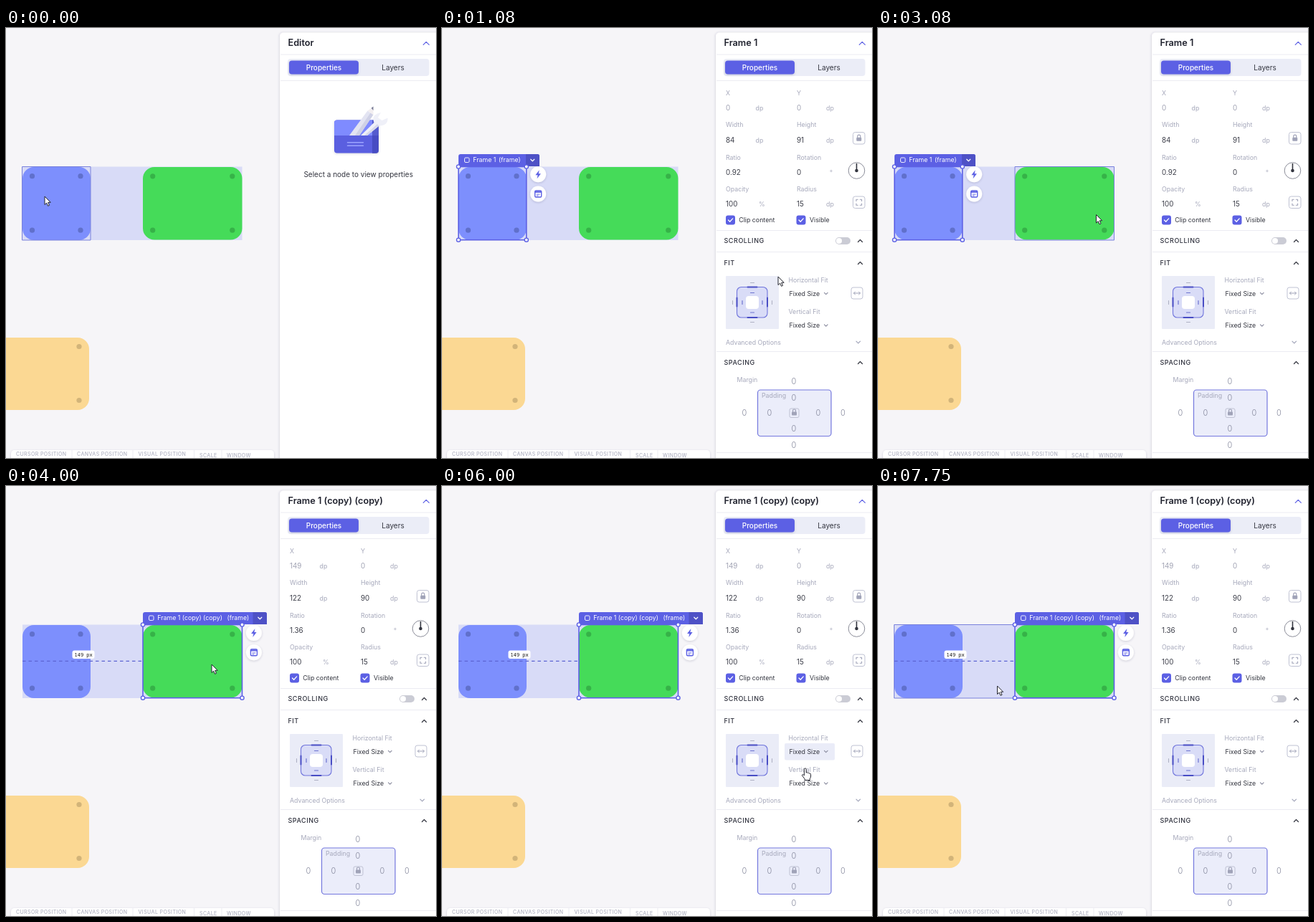
Recreate the animation shown at these times as an HTML page. Size 600 px wide and 600 px high, loop 8 s.

```html
<!DOCTYPE html>
<html lang="en">
<head>
<meta charset="utf-8">
<title>Frame editor</title>
<style>
  html, body { margin: 0; width: 100%; height: 100%; overflow: hidden; background: #f6f5f8; }
  svg { display: block; width: 100vw; height: 100vh; }
  text { font-family: Inter, "Open Sans", sans-serif; font-size: 8.8px; fill: #a6a8bb; white-space: pre; }
  .title { font-size: 12.7px; font-weight: 600; fill: #20222e; }
  .dark { fill: #33353f; }
  .value { font-size: 9.8px; fill: #3b3d48; }
  .dim { font-size: 9.8px; fill: #a0a2b3; }
  .zero { font-size: 11px; font-weight: 300; fill: #85889c; text-anchor: middle; }
  .head { font-size: 9px; font-weight: 500; letter-spacing: .55px; fill: #2f313d; }
  .foot { font-size: 7px; font-weight: 500; letter-spacing: .4px; fill: #b0b2c2; }
  .white { fill: #fff; }
  .mid { text-anchor: middle; }
  .tab { font-size: 10px; }
  .px { font: 500 7px "Noto Sans Mono", "DejaVu Sans Mono", monospace; fill: #111; }
  .rule { stroke: #ececf2; fill: none; }
  .line { fill: none; stroke-linecap: round; stroke-linejoin: round; }
  .box { fill: #fff; stroke: #bfc2d3; }
  .hover { fill: none; stroke: #7880dc; stroke-width: 1; }
</style>
</head>
<body>
<svg id="stage" viewBox="0 0 600 600" xmlns="http://www.w3.org/2000/svg"></svg>
<script>
const BLUE = '#5c60e4', DARK = '#33353f', GRAY = '#a0a3b8';

const text = (x, y, s, cls = '') => `<text x="${x}" y="${y}" class="${cls}">${s}</text>`;
const rect = (x, y, w, h, fill, r = 0, more = '') =>
  `<rect x="${x}" y="${y}" width="${w}" height="${h}" rx="${r}" fill="${fill}" ${more}/>`;
const circle = (x, y, r, fill, more = '') => `<circle cx="${x}" cy="${y}" r="${r}" fill="${fill}" ${more}/>`;
const line = (d, color, w = 1) => `<path class="line" d="${d}" stroke="${color}" stroke-width="${w}"/>`;
const group = (id, body) => `<g id="${id}">${body}</g>`;
const rule = (y, x = 383) => `<path class="rule" d="M${x} ${y}H600"/>`;
const chevron = (x, y, color, size = 3, dir = 1) =>
  line(`M${x - size} ${y + dir * size / 2}l${size} ${-dir * size}l${size} ${dir * size}`, color, 1.2);
const dots = (xs, ys, color) => xs.map(x => ys.map(y => circle(x, y, 3.6, color)).join('')).join('');

const lock = (x, y) => rect(x - 3.5, y - 1, 7, 5, GRAY, 1) +
  line(`M${x - 2} ${y - 1}v-1.5a2 2 0 0 1 4 0v1.5`, GRAY, 1.2);
const check = (x, y) => rect(x - 6.5, y - 6.5, 13, 13, BLUE, 3) +
  line(`M${x - 3} ${y}l2.2 2.3l4 -4.4`, '#fff', 1.3);

function canvas() {
  const labels = [[14, 597, 'CURSOR POSITION'], [99, 597, 'CANVAS POSITION'], [184.5, 597, 'VISUAL POSITION'],
    [270, 599, 'SCALE'], [308, 599, 'WINDOW']];
  return rect(0, 0, 600, 600, '#f6f5f8') +
    rect(23, 193.5, 306.5, 102.5, '#d8dbf7') +
    rect(23, 194, 95, 102, '#7d8ffd', 16) + dots([36.5, 104], [206.7, 282.2], '#6070cb') +
    rect(191, 194, 138.5, 101.5, '#45db59', 16) + dots([204.7, 315.8], [206.8, 282.2], '#36b248') +
    rect(-60, 432, 176, 101, '#fbd893', 16) + dots([102], [444.5, 519.5], '#d2b479') +
    rect(7, 589, 367, 20, '#fff', 5, 'filter="url(#soft)"') +
    [92, 177, 262.5, 301].map(x => `<path class="rule" d="M${x} 589V600"/>`).join('') +
    labels.map(a => text(...a, 'foot')).join('');
}

function shell() {
  return rect(382, 6.5, 240, 620, '#fff', 5, 'filter="url(#shade)"') +
    chevron(586.3, 21.3, BLUE, 4) + rule(37) + rule(73.5) +
    rect(393, 43, 197.5, 24, '#ebedf7', 4) +
    rect(395, 45.5, 97, 19, BLUE, 4, 'filter="url(#soft)"') +
    `<text x="443.5" y="58.7" class="tab white mid" font-weight="500">Properties</text>` +
    text(540, 58.7, 'Layers', 'tab dark mid');
}

function emptyPanel() {
  return text(393.5, 25.3, 'Editor', 'title') +
    `<g filter="url(#soft)">${rect(458, 128.5, 62, 46, '#5a5fe0', 4)}</g>` +
    `<path d="M458 150V132.500a4 4 0 0 1 4 -4H516a4 4 0 0 1 4 4V150Z" fill="#7f8bff"/>
     <path d="M511 128.500h5a4 4 0 0 1 4 4V171a4 4 0 0 1 -4 4h-5Z" fill="#3d42b4" opacity=".65"/>
     <path d="M479 150L504.500 115.500L512.500 121L493 150Z" fill="#e3e4f2"/>
     <path d="M487 150L508.500 118.500L512.500 121L493 150Z" fill="#cfd1e6"/>
     <path d="M504.500 115.500L512.500 109.500L512.500 121Z" fill="#f2eef0"/>
     <path d="M509.700 111.700L512.500 109.500L512.500 115Z" fill="#777b95"/>
     <path d="M495 150L513.500 132Q510 123 518 119.500L523 118L519 125L524.500 129L532.500 125.500Q533.500 136 520.500 136.500L504 150Z" fill="#eff0f8"/>
     <path d="M500 150L518 134L520.500 136.500L504 150Z" fill="#d7d9eb"/>` +
    line('M476.500 159.700H498.500M476.500 164.200H498.500', '#9ca4ff', 1.5) +
    text(491.7, 208.200, 'Select a node to view properties', 'tab dark mid');
}

function fitDiagram() {
  return rect(396, 346, 74, 74, '#eaecf7', 1) +
    rect(411.5, 361.5, 42.5, 42.5, '#d9dcf7', 6, 'stroke="#7075dc" stroke-width="1.1"') +
    rect(424, 374, 18, 18, '#fff', 4) +
    line('M426.500 361.500h13M426.500 404h13M411.500 376.500v12M454 376.500v12', '#484dc4', 2) +
    line('M430.500 369.500h5M430.500 397h5M419 380.500v5M447 380.500v5', '#6d73cf', 1.2) +
    line('M430.500 355.500h5M430.500 410.500h5M405.500 380.500v5M460.500 380.500v5', '#aeb1c4', 1.1);
}

function form() {
  const labels = [[396, 94, 'X'], [495, 94, 'Y'], [396, 138.3, 'Width'], [495, 138.3, 'Height'],
    [396, 183.7, 'Ratio'], [495, 183.7, 'Rotation'], [396, 228.2, 'Opacity'], [495, 228.2, 'Radius'],
    [483.5, 354.8, 'Horizontal Fit'], [483.5, 399.3, 'Vertical Fit'], [396, 441.6, 'Advanced Options'],
    [411.5, 494.2, 'Margin']];
  const units = [115, 159.5, 249].map(y =>
    text(y > 200 ? 442 : 437.5, y, y > 200 ? '%' : 'dp') + text(536, y, 'dp')).join('');
  const zeros = [[491, 497.3], [422, 541.3], [559.5, 541.3], [491, 586]];
  const inner = [[491, 519.5], [457, 541.3], [525, 541.3], [491, 563.3]];
  const zero = ([x, y]) => text(x, y, '0', 'zero');
  return labels.map(a => text(...a)).join('') + units + text(541, 205, '°') +
    text(495, 115.300, '0', 'dim') + text(495, 204.800, '0', 'value') +
    text(396, 249.300, '100', 'value') + text(495, 249.300, '15', 'value') +
    rect(573.5, 145.500, 16.5, 16.5, '#fff', 3, 'class="box"') + lock(581.8, 153.7) +
    circle(578.5, 199, 11.3, '#fff', 'stroke="#8b8d99"') + line('M578.500 199V189.500', DARK, 1.6) +
    circle(578.5, 199, 2.3, DARK) +
    rect(573.5, 235, 16.5, 16.5, '#fff', 3, 'class="box"') +
    line('M578 241.500v-2.300h2.300M583.300 239.200h2.300v2.300M585.600 245v2.300h-2.300M580.300 247.300H578V245', GRAY, 1.1) +
    check(402.5, 268) + text(414.3, 271.400, 'Clip content', 'dark') +
    check(501, 268) + text(513, 271.400, 'Visible', 'dark') +
    rule(282.5) + text(393.5, 300.300, 'SCROLLING', 'head') +
    rect(549, 292, 21, 10, '#cbccd5', 5) + circle(554, 297, 4, '#fff') + chevron(583.5, 297, DARK) +
    rule(312.500) + text(393.5, 331.300, 'FIT', 'head') + chevron(583.5, 328, DARK) +
    fitDiagram() +
    rect(478, 359, 70, 23.500, '#eaecf8', 2, 'id="overH"') + rect(478, 403, 70, 23.500, '#eaecf8', 2, 'id="overV"') +
    text(484.5, 373.500, 'Fixed Size', 'dark') + chevron(535.8, 370.500, '#8b8da0', 2.3, -1) +
    text(484.5, 418, 'Fixed Size', 'dark') + chevron(535.8, 415, '#8b8da0', 2.3, -1) +
    rect(571, 362, 16, 16, '#fff', 3, 'class="box"') +
    line('M574.500 370h9M576.500 368l-2 2l2 2M581.500 368l2 2l-2 2', GRAY) +
    chevron(580.8, 438.500, GRAY, 2.8, -1) +
    rule(451.500) + text(393.5, 470.300, 'SPACING', 'head') + chevron(583.5, 467, DARK) +
    zeros.map(zero).join('') +
    rect(440.5, 505, 102.500, 64.500, '#ebedfa', 4, 'stroke="#7478de" stroke-width="1.2"') +
    text(446, 516, 'Padding') + inner.map(zero).join('') +
    rect(485, 531, 13, 12.500, 'none', 2, 'stroke="#bfc2d3"') + lock(491.5, 536.5) +
    rule(592.500);
}

// Values that depend on the selected node.
function details(name, x, w, h, ratio) {
  return text(393.5, 25.3, name, 'title') + text(396, 115.300, x, 'dim') +
    text(396, 159.700, w, 'value') + text(495, 159.700, h, 'value') + text(396, 204.800, ratio, 'value');
}

// Outline, name tag and round action buttons around a node.
function selection(x, w, tagW, name, typeX, split, btnY) {
  const r = x + w, bx = r + 16.4;
  const handles = [x, r].map(a => [193.5, 295.7].map(b =>
    circle(a, b, 2.6, '#fff', `stroke="${BLUE}" stroke-width="1.4"`)).join('')).join('');
  const round = y => circle(bx, y, 11, '#fff', 'filter="url(#soft)"');
  const y1 = btnY, y2 = btnY + 27.300;
  return rect(x, 193.5, w, 102.2, 'none', 0, `stroke="${BLUE}" stroke-width="1.6"`) +
    `<path d="M${x} 193V179a3 3 0 0 1 3 -3H${x + tagW - 3}a3 3 0 0 1 3 3V193Z" fill="${BLUE}"/>` +
    `<path d="M${split} 193V176H${x + tagW - 3}a3 3 0 0 1 3 3V193Z" fill="#4e51c6"/>` +
    chevron(x + tagW - 9.700, 184.500, '#fff', 2.5, -1) +
    rect(x + 8.500, 181, 6.500, 6.500, 'none', 1.5, 'stroke="#fff" stroke-width=".9"') +
    text(x + 20.300, 187.400, name, 'white') + text(typeX, 187.400, '(frame)', 'white') +
    handles + round(y1) + round(y2) +
    `<path d="M${bx + 1.500} ${y1 - 6}l-5.300 7h3.200l-1 5l5.300 -7h-3.200z" fill="${BLUE}"/>` +
    rect(bx - 4.500, y2 - 4.500, 9, 9, '#fff', 1.5, `stroke="${BLUE}" stroke-width="1.4"`) +
    line(`M${bx - 4} ${y2 - 2.700}h8`, BLUE, 2) + line(`M${bx - 2} ${y2 + .600}h4M${bx - 2} ${y2 + 2.500}h2`, BLUE, .9);
}

const distance = () =>
  `<path d="M23 244.300H191" stroke="#5c64d2" stroke-width="1.2" stroke-dasharray="4.500 4"/>` +
  rect(92.5, 229.500, 31, 11.500, '#fff', 3) + text(95.5, 237.700, '149 px', 'px');

const shadow = (id, dx, dy, blur, alpha) =>
  `<filter id="${id}" x="-30%" y="-40%" width="160%" height="180%"><feDropShadow dx="${dx}" dy="${dy}"
   stdDeviation="${blur}" flood-color="#30345f" flood-opacity="${alpha}"/></filter>`;

const $ = id => document.getElementById(id);
$('stage').innerHTML =
  `<defs>${shadow('soft', 0, 1, 1.5, .22)}${shadow('shade', -.5, 0, 1.5, .2)}</defs>` +
  canvas() +
  `<path id="hoverBlue" class="hover" d="M22.500 193.500H118V296H22.500Z"/>
   <path id="hoverGreen" class="hover" d="M191 193.500H329.500V296H191Z"/>
   <path id="hoverRow" class="hover" d="M22.500 193.500H329.500V296H22.500Z"/>` +
  group('selBlue', selection(23, 94.800, 113, 'Frame 1', 79, 117, 204.2)) +
  group('selGreen', distance() + selection(191, 138.500, 173, 'Frame 1 (copy) (copy)', 308.500, 344.500, 205)) +
  shell() + group('empty', emptyPanel()) + group('form', form()) +
  group('infoBlue', details('Frame 1', '0', '84', '91', '0.92')) +
  group('infoGreen', details('Frame 1 (copy) (copy)', '149', '122', '90', '1.36')) +
  `<path id="arrow" d="M0 0V11.500L2.700 9.100L4.500 13.300L6.500 12.400L4.700 8.300H8.200Z" fill="#fff" stroke="#23242e" stroke-width="1" stroke-linejoin="round"/>
   <path id="hand" d="M-1.300 9V1.300a1.400 1.400 0 0 1 2.800 0V6q1.400 -.900 2.300 .400q1.500 -.700 2.200 .600q1.900 -.300 1.900 1.600V11q0 2 -1.300 3.300V16.500H-.500V14.800L-4 10.200q-.600 -1.500 .700 -1.700q1 0 2 1.500Z" fill="#fff" stroke="#23242e" stroke-width="1" stroke-linejoin="round"/>`;

// Pointer stops: [step, x, y], twelve steps a second.
const STOPS = [
  [6, 54, 235], [7, 66, 230], [8, 118, 216], [9, 200, 222], [10, 292, 250], [11, 375, 292], [12, 436, 328],
  [13, 469, 347], [14, 490, 357], [15, 505, 361], [16, 510, 361], [17, 501, 361], [18, 501, 361], [19, 500, 362],
  [20, 500, 362], [21, 501, 365], [24, 505, 393], [27, 507, 410], [31, 507, 410],
  [32, 497, 404], [34, 410, 341], [36, 322, 272], [38, 287, 249], [56, 287, 249],
  [57, 292, 244], [59, 325, 219], [60, 352, 217], [62, 437, 298], [63, 478, 345], [64, 503, 367],
  [66, 506, 372], [69, 506, 372], [70, 506, 376], [73, 507, 403], [75, 506, 413], [83, 506, 413],
  [84, 486, 421], [85, 462, 430], [87, 380, 408], [89, 285, 352], [91, 201, 300], [93, 166.500, 279]];

function pointer(n) {
  const i = STOPS.findIndex(s => s[0] >= n);
  if (i < 1) return STOPS[i ? STOPS.length - 1 : 0].slice(1);
  const [a, ax, ay] = STOPS[i - 1], [b, bx, by] = STOPS[i], k = (n - a) / (b - a);
  return [ax + (bx - ax) * k, ay + (by - ay) * k];
}

const within = (n, a, b) => n >= a && n <= b;
const show = (id, on) => $(id).style.display = on ? '' : 'none';
const fade = (n, a, b) => Math.max(0, Math.min(1, (n - a + .3) / 3, (b - n) / 2));

function draw(ms) {
  const n = Math.floor((ms + 5) * 12 / 1000);
  const [x, y] = pointer(n);
  const blue = within(n, 2, 47), green = n >= 48;
  const hand = within(n, 14, 31) || within(n, 64, 84);
  const inRow = y > 193 && y < 296;

  show('empty', n < 2);
  show('form', n >= 2);
  for (const part of ['sel', 'info']) {
    show(part + 'Blue', blue);
    show(part + 'Green', green);
  }
  show('hoverBlue', n < 2);
  show('hoverGreen', within(n, 33, 47) && inRow && x < 329);
  show('hoverRow', n > 84 && inRow && x < 191);
  $('overH').style.opacity = Math.max(fade(n, 14, 25), fade(n, 63, 74));
  $('overV').style.opacity = Math.max(fade(n, 24, 34), fade(n, 73, 87));
  show('arrow', !hand);
  show('hand', hand);
  $(hand ? 'hand' : 'arrow').setAttribute('transform', `translate(${x} ${y})`);
}

const start = performance.now();
function tick() {
  draw((performance.now() - start) % 8000);
  requestAnimationFrame(tick);
}
tick();
</script>
</body>
</html>
```
